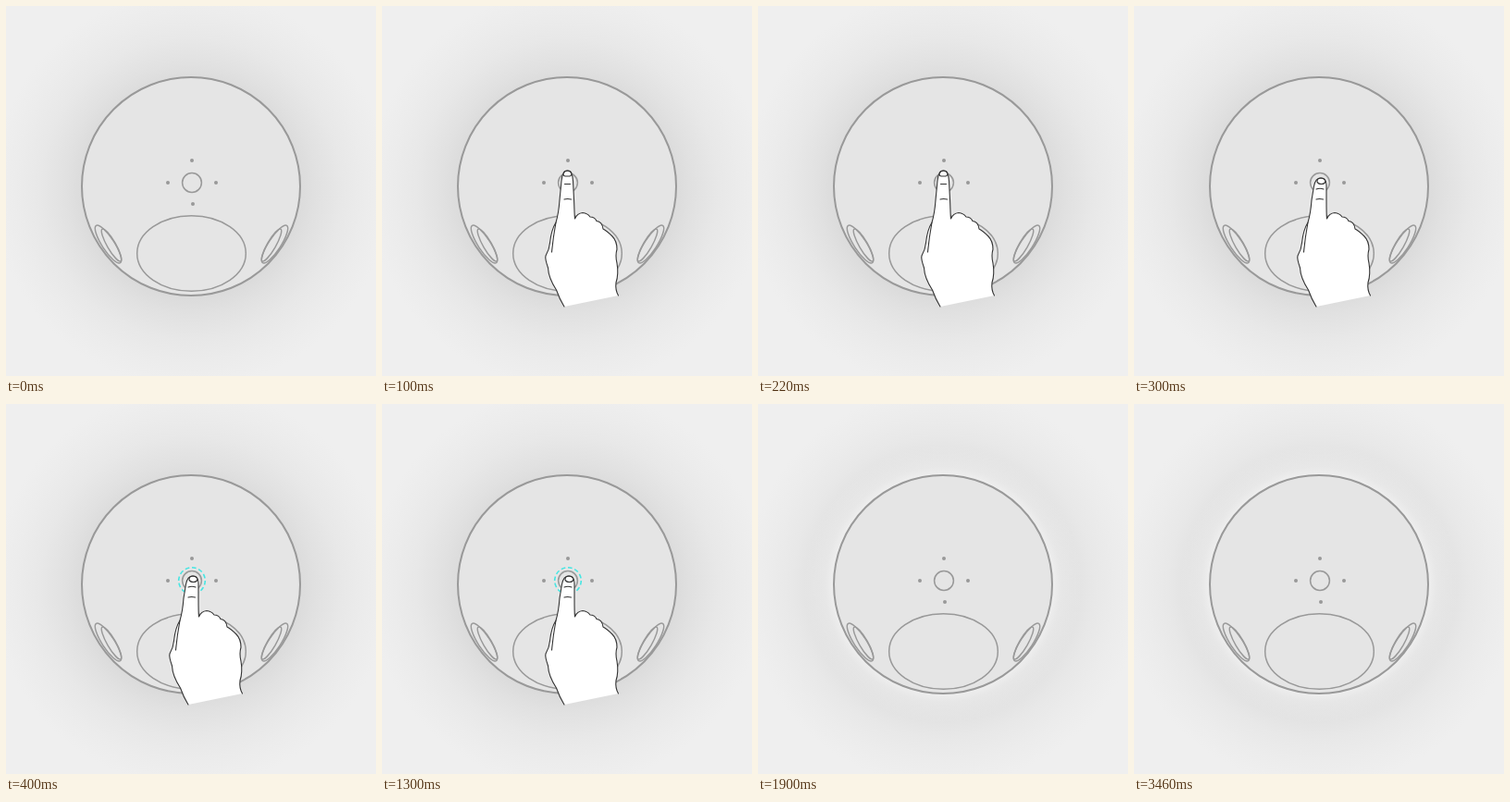
Animation, 400 px wide and 400 px high, one loop 4500 ms. Source, as an HTML page:

```html
<!DOCTYPE html>
<html lang="en">
<head>
<meta charset="utf-8">
<title>Press the button</title>
<style>
  html, body { margin: 0; width: 100%; height: 100%; overflow: hidden; background: #efefef; }
  svg { display: block; width: 100%; height: 100%; }
  .line { fill: none; stroke: #999; stroke-width: 1.5; }
  .ink { fill: none; stroke: #333; stroke-width: 1.1; stroke-linecap: round; stroke-linejoin: round; }
</style>
</head>
<body>
<svg viewBox="0 0 400 400">
  <defs>
    <radialGradient id="shade" gradientUnits="userSpaceOnUse" cx="200" cy="198" r="215">
      <stop offset=".53" stop-color="#dadada"/>
      <stop offset=".63" stop-color="#e1e1e1"/>
      <stop offset=".76" stop-color="#e8e8e8"/>
      <stop offset=".88" stop-color="#ececec"/>
      <stop offset="1" stop-color="#efefef"/>
    </radialGradient>
    <radialGradient id="light" gradientUnits="userSpaceOnUse" cx="200" cy="195" r="150">
      <stop offset=".78" stop-color="#f4f4f4" stop-opacity=".85"/>
      <stop offset=".85" stop-color="#f0f0f0" stop-opacity=".5"/>
      <stop offset="1" stop-color="#eee" stop-opacity="0"/>
    </radialGradient>
    <g id="port" class="line">
      <ellipse rx="24" ry="6.6" transform="translate(110.5 257.5) rotate(57)"/>
      <ellipse rx="20" ry="4.6" transform="translate(114 258.5) rotate(60)"/>
    </g>
  </defs>

  <rect width="400" height="400" fill="url(#shade)"/>
  <circle id="glow" cx="200" cy="195" r="150" fill="url(#light)"/>

  <circle cx="200" cy="195" r="118" fill="#e5e5e5" stroke="#999" stroke-width="2"/>
  <ellipse class="line" cx="200.5" cy="267.5" rx="58.8" ry="40.7"/>
  <use href="#port"/>
  <use href="#port" transform="translate(401) scale(-1 1)"/>
  <circle class="line" cx="201" cy="191" r="10.4"/>
  <g fill="#999">
    <circle cx="201" cy="167" r="2"/>
    <circle cx="175" cy="191" r="2"/>
    <circle cx="227" cy="191" r="2"/>
    <circle cx="202" cy="214" r="2"/>
  </g>
  <circle id="ring" cx="201" cy="191" r="14.3" fill="none" stroke="#45e6e3" stroke-width="1.6"
    pathLength="96" stroke-dasharray="5 3"/>

  <g id="hand">
    <path id="skin" class="ink" style="fill:#fff"/>
    <path class="ink" d="M188 234Q185 250 183.500 266"/>
    <path id="creases" class="ink"/>
  </g>
</svg>
<script>
  const LOOP = 4500, APPEAR = 100, PRESS = 300, LIGHT = 400, LEAVE = 1900;
  const el = id => document.getElementById(id);
  const palm = "C208 219 208 226 208.500 230Q211 224 217 223.500Q222 224 225 228" +
    "Q230 228 232 232.500Q238 233 239 241Q243 243 249 249Q254 254 254 263" +
    "Q252 270 254 278Q256 290 253 299Q252 307 255.500 313";
  const wrist = "M197 325Q192 317 188.500 307Q180 294 179.500 283Q176 273 177 270" +
    "Q181 263 181.500 256Q183 242 188 234Q191 224 192 210";
  const poses = {
    hover: {
      skin: wrist + "L194 189Q195 178 200.500 178Q206 178 206.500 189L207.500 209" + palm,
      creases: "M196 182Q196 178 200.500 178Q205 178 205 182Q204 184 203 184H198Q196.500 184 196 182" +
        "M197.500 192.500H203.500M197 209Q200.500 208 204.500 209"
    },
    press: {
      skin: wrist + "L194.500 195Q196 186 202 186Q208 186 208 194L208 209" + palm,
      creases: "M198 190Q198 186 202 186Q206.500 186 207 190Q206 192.500 202.500 192.500Q199 192.500 198 190" +
        "M197 198Q201 196.500 205 198M197 209Q200.500 208 204.500 209"
    }
  };
  const show = (id, on) => el(id).setAttribute("visibility", on ? "visible" : "hidden");

  function draw(now) {
    const t = now % LOOP;
    const pose = t < PRESS ? poses.hover : poses.press;
    for (const id in pose) el(id).setAttribute("d", pose[id]);
    show("hand", t >= APPEAR && t < LEAVE);
    show("ring", t >= LIGHT && t < LEAVE);
    show("glow", t >= LEAVE);
  }

  const start = performance.now();
  function tick() {
    draw(performance.now() - start);
    requestAnimationFrame(tick);
  }
  tick();
</script>
</body>
</html>
```
